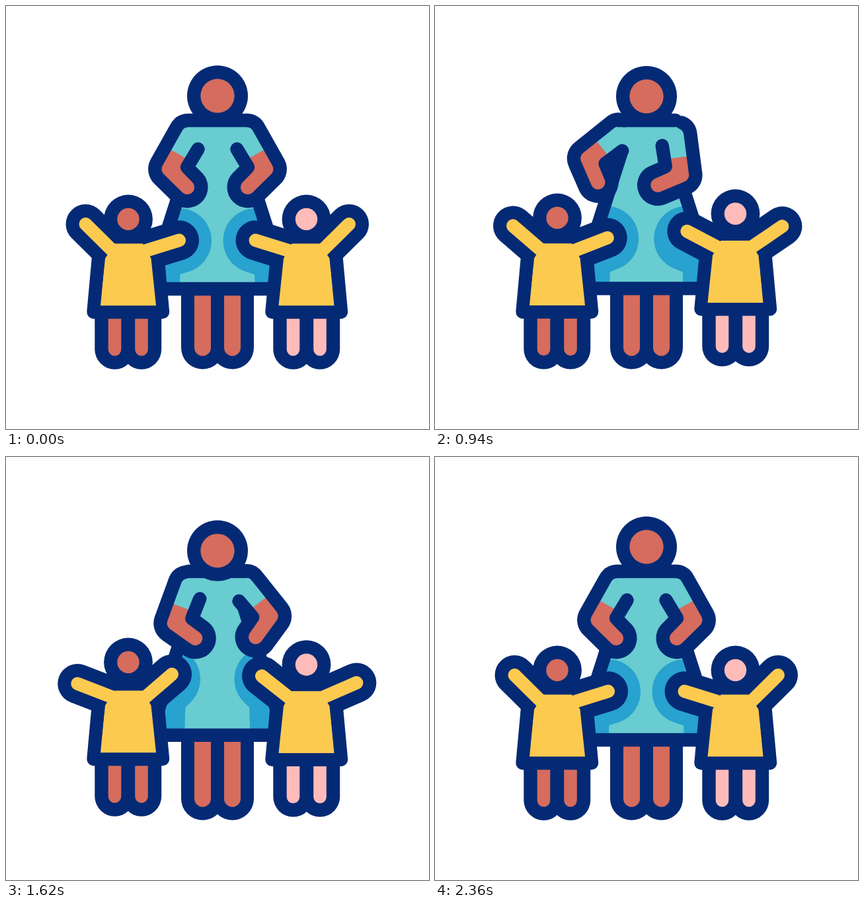
Write an HTML page that moves like this. It is 640 by 640 pixels and loops after 3.6 s.

```html
<!DOCTYPE html>
<html lang="en">
<head>
<meta charset="utf-8">
<title>Teacher with two children</title>
<style>
  html, body { margin: 0; width: 100%; height: 100%; overflow: hidden; background: #fff; }
  svg { display: block; width: 100%; height: 100%; }
  svg { --navy: #042a75; --teal: #68ccd1; --blue: #28a2ce; --gold: #fdca50; --brown: #d56c5d; --pink: #ffbbb9; }
  path { stroke-linecap: round; stroke-linejoin: round; fill: none; }
  .edge { stroke: var(--navy); stroke-width: 20.4; }
  .teal { fill: var(--teal); }
  .gold { fill: var(--gold); }
  .brown { fill: var(--brown); }
  .side { fill: var(--blue); }
</style>
</head>
<body>
<svg viewBox="0 0 640 640">
  <defs>
    <clipPath id="dressClip"><path id="clipShape"/></clipPath>
    <clipPath id="skinClip"><path d="M220 201L302 247V330H200V201Z"/></clipPath>
    <path id="armShape" d="M276 173Q263 173 257 185L228 236.500A21 21 0 0 0 231.700 261.800L260.700 290.300A21 21 0 0 0 290.300 260.700L274 244L290.500 216.500"/>
    <g id="arm"></g>
    <g id="shade">
      <path class="reach" stroke="var(--blue)" stroke-width="98"/>
      <path class="side"/>
    </g>
  </defs>
  <g id="woman">
    <path d="M297.500 390V517M342.500 390V517" stroke="var(--navy)" stroke-width="65"/>
    <path d="M297.500 390V517M342.500 390V517" stroke="var(--brown)" stroke-width="25"/>
    <path id="dress" class="teal"/>
    <g clip-path="url(#dressClip)">
      <use href="#shade"/>
      <use href="#shade" transform="matrix(-1 0 0 1 639.500 0)"/>
    </g>
    <path id="dressEdge" class="edge"/>
    <path class="teal" d="M271 176L276 173H364L369 176L357 225H283Z"/>
    <g id="armL"><use href="#arm"/></g>
    <g transform="matrix(-1 0 0 1 640 0)"><g id="armR"><use href="#arm"/></g></g>
    <path class="edge" d="M276 173H364"/>
    <g id="head">
      <circle cx="320" cy="136" r="46" fill="var(--navy)"/>
      <circle cx="320" cy="136" r="25.700" fill="var(--brown)"/>
    </g>
  </g>
  <g id="kidL"></g>
  <g id="kidR" transform="matrix(-1 0 0 1 639.500 0)"></g>
</svg>
<script>
const LOOP = 3600;
const $ = id => document.getElementById(id);

// Eased value from a table of [time, value] steps
function key(t, steps) {
  if (t <= steps[0][0]) return steps[0][1];
  for (let i = 1; i < steps.length; i++) {
    const [t0, a] = steps[i - 1], [t1, b] = steps[i];
    if (t < t1) {
      const s = (t - t0) / (t1 - t0);
      return a + (b - a) * s * s * (3 - 2 * s);
    }
  }
  return steps[steps.length - 1][1];
}

const SWING = [[0, 0], [540, 1], [1080, 0], [1620, 1], [2160, 0]];
const HOP = [[30, 0], [430, -6], [620, -6], [980, 0], [1080, 0], [1520, -6], [1700, -6], [2060, 0]];
const NOD = [[0, 0], [560, 6.6], [1040, 0], [1520, 6.6], [2000, 0]];
const ARMS = [[0, 0], [243, -22], [930, 22], [1450, -22], [1760, 0]];
const HEM = [[90, 428], [650, 415], [1070, 431], [1430, 415], [1900, 431.3], [2160, 428]];

const line = (d, color, width) => `<path d="${d}" stroke="${color}" stroke-width="${width}"/>`;

const armPath = $("armShape").getAttribute("d");
$("arm").innerHTML = `
  <path class="teal" d="${armPath}Z"/>
  <path class="brown" clip-path="url(#skinClip)" d="${armPath}Z"/>
  <path class="edge" d="${armPath}"/>`;

function buildKid(root, skin) {
  const legs = "M164.500 455V519.500M205 455V519.500";
  const left = "M120.500 330L160 369", right = "M262 354.500L209 371";
  const limbs = (color, w) =>
    `<g class="armA">${line(left, color, w)}</g><g class="armB">${line(right, color, w)}</g>`;
  root.innerHTML = `
    <g class="body">
      ${line(legs, "var(--navy)", 60.4)}${line(legs, skin, 19.6)}
      ${limbs("var(--navy)", 60)}
      <path class="edge" d="M140 381L132.500 463H237L229.500 381"/>
    </g>
    <g class="face">
      <circle cx="185" cy="322.500" r="36.900" fill="var(--navy)"/>
      <circle cx="185" cy="322.500" r="16.700" fill="${skin}"/>
    </g>
    <g class="body">
      <path class="gold" d="M164 359.500H207L219.500 382L227 453.300H143L150 382Z"/>
      ${limbs("var(--gold)", 20)}
    </g>`;
  const all = c => [...root.querySelectorAll(c)];
  return { body: all(".body"), face: all(".face"), armA: all(".armA"), armB: all(".armB") };
}

const put = (list, value) => list.forEach(el => el.setAttribute("transform", value));

function poseKid(kid, t, armLag, bodyLag) {
  const turn = -23.5 * key(t - armLag, SWING);
  put(kid.armA, `rotate(${turn} 160 369)`);
  put(kid.armB, `rotate(${turn} 209 371)`);
  put(kid.body, `translate(0 ${key(t - bodyLag, HOP)})`);
  put(kid.face, `translate(0 ${-12 * key(t - bodyLag, SWING)})`);
}

const kidL = buildKid($("kidL"), "var(--brown)");
const kidR = buildKid($("kidR"), "var(--pink)");
const reach = document.querySelector(".reach"), side = document.querySelector(".side");

function poseWoman(t) {
  const hem = key(t, HEM), half = 37 + (hem - 218) * 0.32;
  const d = `M283 218L${320 - half} ${hem}H${320 + half}L357 218`;
  for (const id of ["dress", "dressEdge", "clipShape"]) $(id).setAttribute("d", d);

  const k = key(t, SWING);
  reach.setAttribute("d", `M209 372L${262 - 17 * k} ${355 - 19 * k}`);
  side.setAttribute("d", `M190 372H${265 + 6.5 * k}L${262 + 7.5 * k} 440H190Z`);

  const turn = key(t, ARMS);
  $("armL").setAttribute("transform", `rotate(${turn} 280 199)`);
  $("armR").setAttribute("transform", `rotate(${-turn} 280 199)`);
  $("head").setAttribute("transform", `translate(0 ${key(t, NOD)})`);
}

const start = performance.now();
function draw(now) {
  const t = Math.max(0, now - start) % LOOP;
  poseWoman(t);
  poseKid(kidL, t, 0, 0);
  poseKid(kidR, t, 110, 200);
  requestAnimationFrame(draw);
}
draw(start);
</script>
</body>
</html>
```
